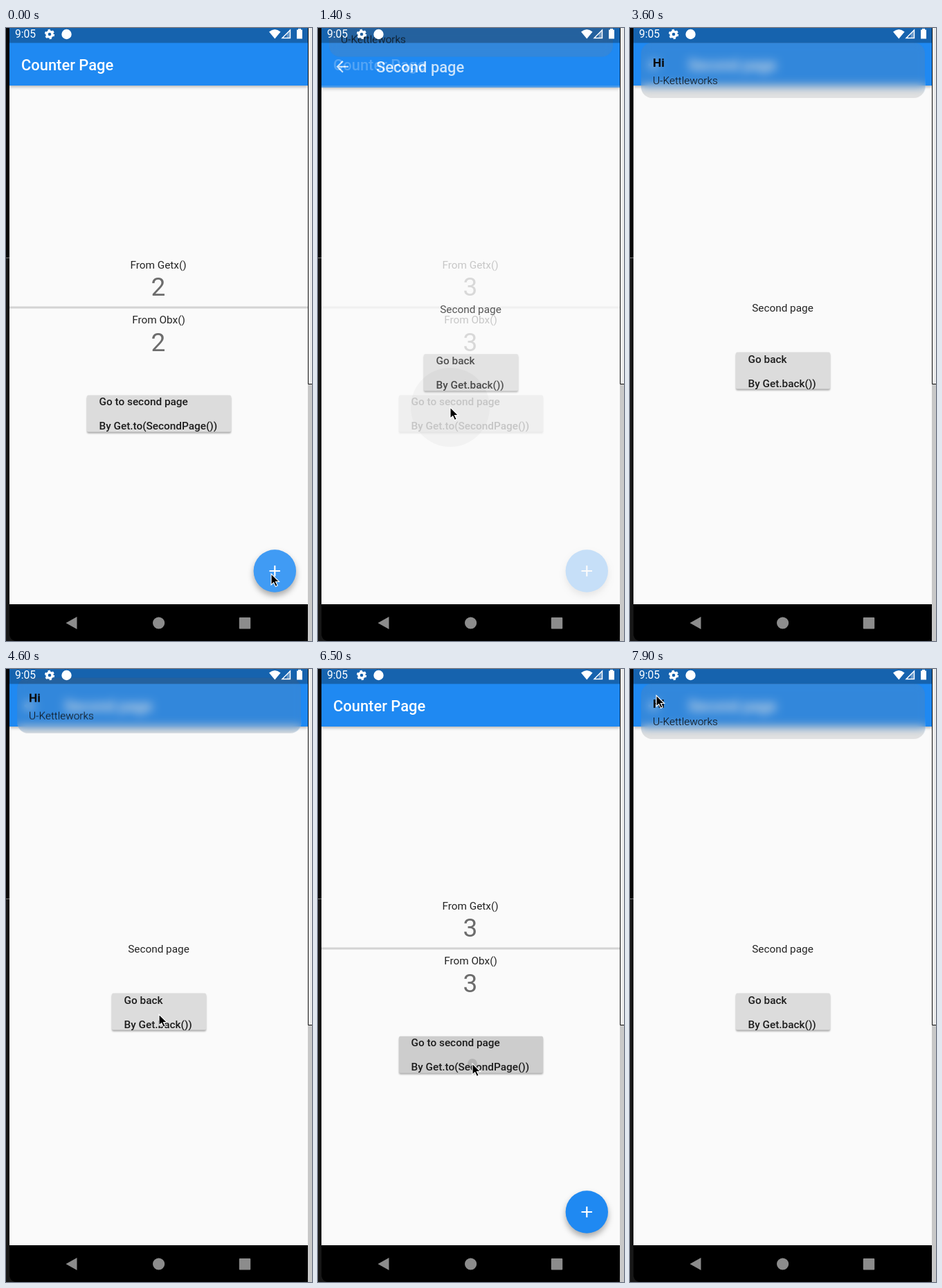
These frames come from a looping animation (442x884 px, 8 s). An HTML page:

```html
<!DOCTYPE html>
<html lang="en">
<head>
<meta charset="utf-8">
<title>Counter Page</title>
<style>
  html, body { margin: 0; width: 100%; height: 100%; overflow: hidden; background: #070707; }
  #stage { position: relative; width: 442px; height: 884px; overflow: hidden; }
  svg { position: absolute; left: 0; top: 0; overflow: visible; font: 15.35px Roboto, sans-serif; }
  #screen { position: absolute; inset: 0; clip-path: inset(0 6px 53px 5px); }
  .mid { text-anchor: middle; fill: #242424; }
  .num { text-anchor: middle; font-size: 37px; fill: #6c6c6c; }
  .title { font-size: 21.9px; font-weight: 500; fill: #fff; }
  .label { font-weight: 500; fill: #1c1c1c; }
  .bar { fill: #1f89f2; filter: drop-shadow(0 2px 2px rgba(0,0,0,.28)); }
  .button { fill: #dcdcdc; filter: drop-shadow(0 2px 1.3px rgba(0,0,0,.32)); }
  .fab { fill: #1f89f2; filter: drop-shadow(0 5px 4px rgba(0,0,0,.32)); }
  #snack {
    position: absolute; left: 15.5px; top: 21px; width: 410.5px; height: 80px;
    border-radius: 16px; background: rgba(128,128,128,.2);
    backdrop-filter: blur(7px);
  }
  #snack svg { left: -15.5px; top: -21px; }
</style>
</head>
<body>
<div id="stage">
  <svg width="442" height="884">
    <rect x="436" width="6" height="513" fill="#ededed"/>
    <rect x="436" y="513" width="6" height="371" fill="#c8c8c8"/>
    <path d="M436.5 0V513.5H442" fill="none" stroke="#111"/>
    <path d="M0 331.5H5" stroke="#777"/>
    <path d="M0 332H5V872Q5 884 16 884H0Z" fill="#171717"/>
    <path d="M5 830H436V872Q436 884 425 884H16Q5 884 5 872Z"/>
    <g fill="#8c8c8c">
      <path d="M86.5 858L102.5 849V867Z"/>
      <circle cx="220.6" cy="858" r="8.6"/>
      <rect x="336.8" y="850" width="16.4" height="16.4" rx="1"/>
    </g>
  </svg>

  <div id="screen">
    <svg width="442" height="884">
      <rect x="5" y="-4" width="431" height="835" fill="#fafafa"/>
      <rect class="bar" x="5" y="-4" width="431" height="87"/>
      <text class="title" x="22" y="61">Counter Page</text>
      <text class="mid" x="220" y="347">From Getx()</text>
      <text class="num count" x="220" y="386">2</text>
      <rect x="5" y="401.5" width="431" height="3" fill="#d3d3d3"/>
      <text class="mid" x="220.5" y="426">From Obx()</text>
      <text class="num count" x="220" y="466">2</text>
      <rect class="button" x="117" y="529.5" width="208" height="53" rx="2"/>
      <g id="goPress" style="clip-path: inset(0)">
        <rect x="117" y="529.5" width="208" height="53" rx="2" fill-opacity=".07"/>
        <circle fill-opacity=".13"/>
      </g>
      <text class="label" x="134.5" y="543.5">Go to second page</text>
      <text class="label" x="134.5" y="578.5">By Get.to(SecondPage())</text>
      <circle class="fab" cx="388.3" cy="783" r="30.7"/>
      <circle id="fabPress" cx="388.3" cy="783" r="30.7" fill="#fff"/>
      <path d="M380.5 783H396M388.3 775.2V790.8" stroke="#fff" stroke-width="2.2"/>
    </svg>

    <svg id="second" width="442" height="884">
      <rect x="5" y="-4" width="431" height="835" fill="#fafafa"/>
      <rect class="bar" x="5" y="-4" width="431" height="87"/>
      <path d="M44 53H28.5M36 45L28 53L36 61" fill="none" stroke="#fff" stroke-width="2.2"/>
      <text class="title" x="84" y="61">Second page</text>
      <text class="mid" x="220.5" y="408.5">Second page</text>
      <rect class="button" x="153" y="467.5" width="136" height="53" rx="2"/>
      <g id="backPress" style="clip-path: inset(0)">
        <rect x="153" y="467.5" width="136" height="53" rx="2" fill-opacity=".07"/>
        <circle fill-opacity=".13"/>
      </g>
      <text class="label" x="170.5" y="482.5">Go back</text>
      <text class="label" x="170.5" y="517.5">By Get.back())</text>
    </svg>

    <div id="snack">
      <svg width="442" height="884">
        <text x="33" y="55.5" font-size="17.4" font-weight="700" fill="#0b0b0b">Hi</text>
        <text x="33" y="81" font-weight="300" fill="#0b0b0b">U-Kettleworks</text>
      </svg>
    </div>

    <svg width="442" height="884">
      <rect x="5" width="431" height="21.5" fill-opacity=".28"/>
      <g fill="#fff">
        <text x="13" y="14.3" font-size="15.6">9:05</text>
        <circle cx="63" cy="9" r="4" fill="none" stroke="#fff" stroke-width="3.4"/>
        <circle cx="63" cy="9" r="6.2" fill="none" stroke="#fff" stroke-width="2" stroke-dasharray="3.25 3.25"/>
        <circle cx="87.5" cy="9" r="7.2"/>
        <path d="M380 5.5Q388.3-1.5 396.6 5.5L388.3 15.5Z"/>
        <path d="M399 14.5L410.5 3V14.5Z" fill="none" stroke="#fff" stroke-width="1.4"/>
        <path d="M405.5 14.5V8L411 2.5V15H405.5Z" fill-opacity=".35"/>
        <path d="M422 2.5V1H426V2.5H428V15.5H420V2.5Z"/>
      </g>
    </svg>
  </div>

  <svg width="442" height="884">
    <path id="cursor" d="M0 0V16L3.7 12.6L6.4 18.4L9.2 17.1L6.5 11.5H11.6Z"
          stroke="#fff" stroke-width="1.1"/>
  </svg>
</div>

<script>
const LOOP = 8000, STEP = 100;
const $ = id => document.getElementById(id);
const clamp = v => Math.min(1, Math.max(0, v));

function bezier(x1, y1, x2, y2) {
  const at = (a, b, s) => 3 * a * s * (1 - s) ** 2 + 3 * b * s * s * (1 - s) + s ** 3;
  return x => {
    let lo = 0, hi = 1;
    for (let i = 0; i < 24; i++) {
      const s = (lo + hi) / 2;
      if (at(x1, x2, s) < x) lo = s; else hi = s;
    }
    return at(y1, y2, (lo + hi) / 2);
  };
}
const fastOutSlowIn = bezier(.4, 0, .2, 1);
const easeIn = bezier(.42, 0, 1, 1);
const easeOutCirc = bezier(.075, .82, .165, 1);
const smooth = bezier(.42, 0, .58, 1);

// Cursor waypoints: time, x, y
const path = [
  [0, 383, 787], [400, 383, 787], [1000, 191, 547], [1400, 191, 547],
  [2100, 230, -30], [3600, 230, -30], [4300, 221, 498], [5000, 221, 498],
  [5300, 230, 550], [5700, 223, 569], [6600, 223, 569], [6800, 254, 368],
  [7300, 150, 100], [7900, 38, 38], [8000, 38, 38]
];

function cursorAt(t) {
  const i = path.findIndex(p => p[0] > t);
  const [t0, x0, y0] = path[i - 1], [t1, x1, y1] = path[i];
  const k = smooth((t - t0) / (t1 - t0));
  return [x0 + (x1 - x0) * k, y0 + (y1 - y0) * k];
}

// Linear progress of something opening and closing again
function progress(t, open, close, duration) {
  return clamp((t - open) / duration) - clamp((t - close) / duration);
}

function press(id, t, start, x, y) {
  const age = t - start, group = $(id), ripple = group.lastElementChild;
  group.style.opacity = age < 0 ? 0 : clamp((600 - age) / 300);
  ripple.setAttribute('cx', x);
  ripple.setAttribute('cy', y);
  ripple.setAttribute('r', Math.max(0, 7 + age * .25));
}

function draw(t) {
  for (const e of document.querySelectorAll('.count')) e.textContent = t < 100 ? 2 : 3;
  $('fabPress').setAttribute('opacity', .15 * clamp((600 - t) / 500));
  if (t < 4000) press('goPress', t, 1200, 191, 547);
  else press('goPress', t, 6500, 223, 569);
  press('backPress', t, 4700, 221, 498);

  // The first opening stays frozen until 1400 ms.
  const page = t < 1400 ? 0 : t < 6000 ? progress(t, 1145, 4820, 300) : progress(t, 6530, 9999, 300);
  $('second').style.opacity = easeIn(page);
  $('second').style.transform = `translateY(${209 * (1 - fastOutSlowIn(page))}px)`;

  const snack = t < 1400 ? 0 : t < 6000 ? progress(t, 1145, 4205, 1000) : progress(t, 6530, 9999, 1000);
  $('snack').style.transform = `translateY(${-385 * (1 - easeOutCirc(snack))}px)`;

  $('cursor').setAttribute('transform', `translate(${cursorAt(t)})`);
}

function tick() {
  draw(Math.floor(performance.now() / STEP) * STEP % LOOP);
  requestAnimationFrame(tick);
}
tick();
</script>
</body>
</html>
```
